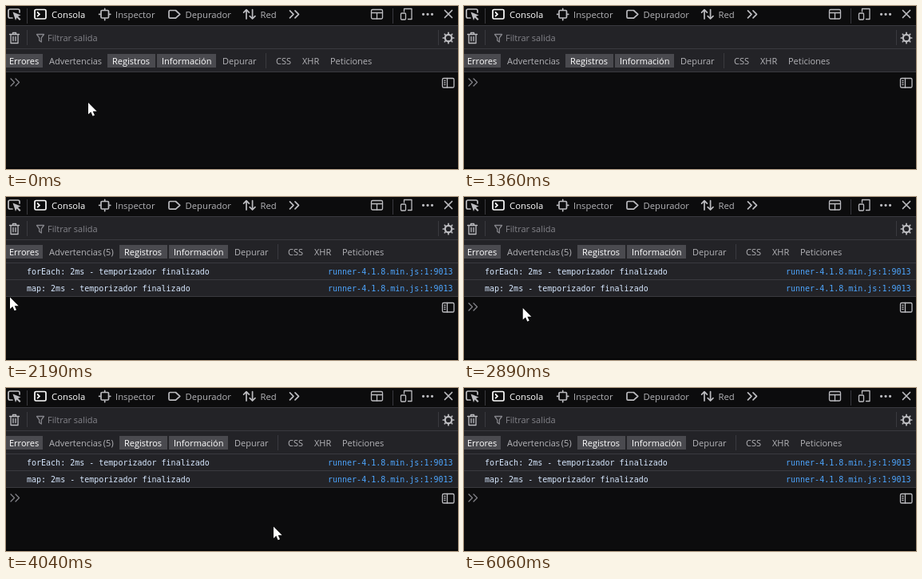
Animation, 566 px wide and 204 px high, one loop 7.37 s. Source, as an HTML page:

```html
<!DOCTYPE html>
<html lang="es">
<head>
<meta charset="utf-8">
<title>Consola</title>
<style>
html, body { margin: 0; width: 100%; height: 100%; overflow: hidden; background: #0c0c0d; }
svg { display: block; }
text { font: 11px "Open Sans", "Noto Sans", sans-serif; fill: #b4b4b8; white-space: pre; }
.tab { font-size: 11.3px; }
.on { fill: #fff; }
.hint { fill: #84848a; }
.mono { font: 10px "DejaVu Sans Mono", "Liberation Mono", monospace; fill: #d7e8ff; }
.link { fill: #4da6ff; }
.bar { fill: #232327; }
.edge { fill: #3a3a3f; }
.chip { fill: #4a4a4f; }
.icon { fill: none; stroke: #bcbcc0; stroke-width: 1.7; stroke-linejoin: round; stroke-linecap: round; }
.thin { stroke-width: 1.3; }
.solid { fill: #bcbcc0; stroke: none; }
.white { stroke: #fff; }
.dim { stroke: #84848a; stroke-width: 1.3; }
</style>
</head>
<body>
<svg width="566" height="204" viewBox="0 0 566 204">
  <defs><path id="chevron" d="M0 -4.5L4.5 0L0 4.5"/></defs>
  <rect width="566" height="204" fill="#0c0c0d"/>
  <rect y="202" width="566" height="2" fill="#060607"/>
  <rect class="bar" y="24" width="566" height="59"/>
  <g id="lines"></g>

  <g class="icon">
    <path d="M8 15H5Q3 15 3 13V6Q3 4 5 4H15Q17 4 17 6V8"/>
    <path class="solid" d="M8.5 7.5L18.5 11.5L15 13L18.5 16.5L17 18L13.5 14.5L12 18Z"/>
    <g class="white">
      <rect x="36" y="4.5" width="14" height="11.5" rx="1.6"/>
      <path d="M39.5 8L42 10.3L39.5 12.6"/>
    </g>
    <rect x="119" y="5.5" width="9.5" height="9.5" rx="1.2"/>
    <path d="M123.7 3.4V5M123.7 16V17.6M116.6 10.3H118M129.4 10.3H130.8"/>
    <path d="M205.5 5.5H212.5L217.8 10.3L212.5 15.1H205.5Q204 15.1 204 13.7V6.900Q204 5.500 205.500 5.500Z"/>
    <path d="M301 16V5M297.6 8.200L301 4.600L304.400 8.200M308.600 4.600V15.600M305.200 12.600L308.600 16L312 12.600"/>
    <use href="#chevron" x="355.500" y="10.300"/>
    <use href="#chevron" x="362" y="10.300"/>
    <g class="thin">
      <rect x="457.500" y="4.500" width="14" height="11.500" rx="1.400"/>
      <path d="M457.500 8.500H471.500M464.500 8.500V16"/>
      <path d="M498.500 7V3.500H508V16.500H503.500"/>
      <rect x="494.500" y="9" width="6" height="8" rx="1"/>
    </g>
    <path d="M522.500 10.300H522.600M528 10.300H528.100M533.500 10.300H533.600" stroke-width="3.200"/>
    <path d="M549.500 5.500L558.500 14.500M558.500 5.500L549.500 14.500"/>
    <path class="thin" d="M4.500 35.500H16.500M8.500 35V33.500H12.500V35M6 36V46.500H15V36M9 38.500V43.500M12 38.500V43.500"/>
    <path class="dim" d="M38.500 35.500H47.500L44.300 39.800V45L41.700 43.300V39.800Z"/>
    <circle cx="554" cy="40" r="4.200" stroke-width="2.200"/>
    <g id="teeth"></g>
  </g>
  <text class="tab on" x="57" y="14.500">Consola</text>
  <text class="tab" x="137" y="14.500">Inspector</text>
  <text class="tab" x="224.500" y="14.500">Depurador</text>
  <text class="tab" x="318.500" y="14.500">Red</text>
  <text class="hint" x="52" y="44">Filtrar salida</text>

  <g id="fixed"></g>
  <text id="count" x="119" y="73"> (5)</text>
  <g id="moving"></g>
  <g id="log"></g>

  <g id="prompt" class="icon dim">
    <use href="#chevron" x="6" y="95.500"/>
    <use href="#chevron" x="12" y="95.500"/>
  </g>
  <g id="side" class="icon thin">
    <rect x="546.500" y="90.500" width="14.500" height="11.500" rx="1.600"/>
    <path d="M552.500 90.500V102M549 93.500H550M549 96H550M549 98.500H550"/>
  </g>
  <path id="cursor" d="M0 0V14.500L3.300 11.500L5.600 16.800L8 15.800L5.700 10.800H10.700Z" fill="#fff" stroke="#000" stroke-width=".8" paint-order="stroke"/>
</svg>
<script>
const LOOP = 7370, STEP = 83;
const el = id => document.getElementById(id);
const show = (id, on) => el(id).setAttribute("visibility", on ? "visible" : "hidden");
const shift = (id, x, y) => el(id).setAttribute("transform", `translate(${x} ${y})`);
const rect = (cls, x, y, w, h) => `<rect class="${cls}" x="${x}" y="${y}" width="${w}" height="${h}"/>`;
const text = (cls, x, y, s) => `<text class="${cls}" x="${x}" y="${y}">${s}</text>`;
const row = y => rect("edge", 0, y, 566, 1);
const divider = (x, y) => rect("edge", x, y, 1, 19);

// A filter lights up when it is given a chip width.
const filter = (x, label, chip) =>
  (chip ? rect("chip", x - 6, 60, chip, 17) : "") + text(chip ? "on" : "", x, 73, label);

const message = (s, i) => {
  const y = 83 + 21 * i;
  return rect("bar", 0, y, 566, 21) + row(y + 20) +
    text("mono", 26, y + 14, `${s}: 2ms - temporizador finalizado`) +
    text("mono link", 403, y + 14, "runner-4.1.8.min.js:1:9013");
};

el("lines").innerHTML = [24, 53, 82].map(row).join("") +
  divider(26, 3) + divider(484, 3) + divider(26, 30) + divider(541, 30);
el("fixed").innerHTML = filter(4, "Errores", 48) + filter(54, "Advertencias");
el("moving").innerHTML = filter(133, "Registros", 60) + filter(195, "Información", 74) +
  filter(271, "Depurar") + divider(325, 59) +
  filter(338, "CSS") + filter(371, "XHR") + filter(406, "Peticiones");
el("log").innerHTML = ["forEach", "map"].map(message).join("");
el("teeth").innerHTML = Array.from({ length: 8 }, (_, i) =>
  `<path d="M554 34.8V33.3" transform="rotate(${i * 45} 554 40)"/>`).join("");

const out = power => p => 1 - (1 - p) ** power;
const smooth = p => p * p * (3 - 2 * p);
const trip = (start, end, from, to, easeX = out(1), easeY = easeX) =>
  ({ start, end, from, to, easeX, easeY });

const trips = [
  trip(340, 1360, [103, 121], [0, 83]),
  trip(2190, 3190, [5, 125.5], [74, 139], out(5)),
  trip(3190, 4040, [74, 139], [335, 173.5], smooth, out(1.8)),
  trip(4510, 4740, [335, 173.5], [338, 173.5]),
  trip(5060, 6060, [342, 174], [512, 201], out(1.2))
];

function cursorAt(t) {
  const { start, end, from, to, easeX, easeY } = trips.findLast(s => s.start <= t) || trips[0];
  const held = Math.floor((t - start) / STEP) * STEP;
  const p = t >= end ? 1 : Math.max(0, held / (end - start));
  return [
    from[0] + (to[0] - from[0]) * easeX(p),
    from[1] + (to[1] - from[1]) * easeY(p)
  ];
}

function draw(t) {
  const counted = t >= 2020, logged = t >= 2190;
  const drop = logged ? 42 : 0;
  show("count", counted);
  shift("moving", counted ? 15 : 0, 0);
  show("log", logged);
  shift("side", 0, drop);
  shift("prompt", 0, drop);
  show("prompt", !logged || t >= 2260);
  show("cursor", t < 1360 || (logged && t < 6060));
  shift("cursor", ...cursorAt(t));
}

let begin;
function tick(now) {
  begin ??= now;
  draw((now - begin) % LOOP);
  requestAnimationFrame(tick);
}
draw(0);
requestAnimationFrame(tick);
</script>
</body>
</html>
```
